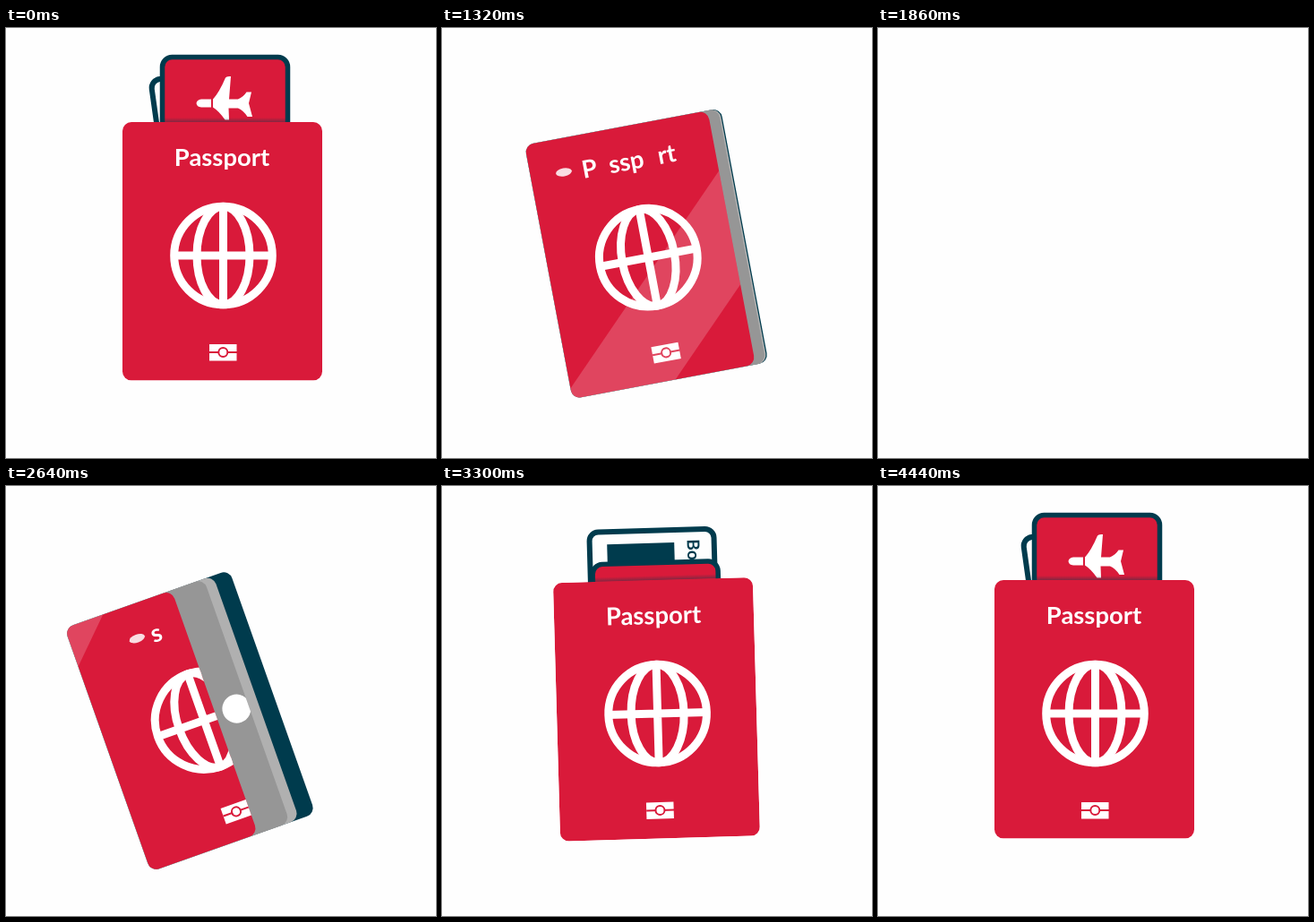
These frames come from a looping animation (480x480 px, 4770 ms). An HTML page:

```html
<!DOCTYPE html>
<html lang="en">
<head>
<meta charset="utf-8">
<title>Passport</title>
<style>
html, body { margin: 0; width: 100%; height: 100%; overflow: hidden; background: #fefefe; }
svg { display: block; width: 100vw; height: 100vh; }
text { font-family: Lato, sans-serif; font-weight: 700; }
</style>
</head>
<body>
<svg viewBox="0 0 480 480">
  <defs>
    <clipPath id="coverClip"><rect id="coverMask" x="130" y="105" width="223" height="288.5" rx="10"/></clipPath>
    <clipPath id="pageClip"><rect id="pageMask" x="130" y="105" width="223" height="288.5" rx="10"/></clipPath>
    <linearGradient id="shade" x2="0" y2="1">
      <stop offset="0" stop-color="#003b4d" stop-opacity="0"/>
      <stop offset="1" stop-color="#003b4d" stop-opacity=".4"/>
    </linearGradient>
  </defs>
  <g id="book">
    <g id="cards">
      <g id="pass">
        <rect x="172" y="48" width="139" height="174" rx="10" fill="#fefefe" stroke="#003b4d" stroke-width="6"/>
        <rect x="191.5" y="62" width="75" height="120" fill="#003b4d"/>
        <text transform="translate(281 59) rotate(90)" font-size="19" fill="#003b4d">Boarding pass</text>
      </g>
      <g id="ticket">
        <rect x="174.5" y="32.5" width="140" height="174" rx="11" fill="#d91a3a" stroke="#003b4d" stroke-width="5.5"/>
        <path fill="#fff" d="M229 79.5H218Q213 80 212.5 84Q213 88 218 88.5H229ZM231 79.5Q238 72 245 55.5Q246 53.5 251 54L249 79.5H259Q265 77 268.5 71.5H274L271 84L275 99H269.5Q265 92 259 89.5H248.5L249 102.5H244.5Q238 93 231 88.5Z"/>
      </g>
      <rect x="173" y="100" width="143" height="5" fill="url(#shade)"/>
    </g>
    <g id="pages">
      <rect id="back" x="130" y="105" height="288.5" rx="10" fill="#003b4d"/>
      <rect id="leaf" x="130" y="105" height="288.5" rx="10" fill="#b0b0b0"/>
      <rect id="page" x="130" y="105" height="288.5" rx="10" fill="#969696"/>
      <g clip-path="url(#pageClip)"><circle cx="281" cy="254" r="16" fill="#fff"/></g>
    </g>
    <g clip-path="url(#coverClip)">
      <rect x="130" y="105" width="223" height="288.5" fill="#d91a3a"/>
      <text x="241" y="154" font-size="27.4" text-anchor="middle" fill="#fff" id="title"></text>
      <ellipse id="smear" cy="143" rx="9" ry="4.5" fill="#fff" opacity="0"/>
      <g fill="none" stroke="#fff" stroke-width="9">
        <circle cx="242.5" cy="254" r="54.8"/>
        <ellipse cx="242.5" cy="254" rx="29.5" ry="54.8"/>
        <path d="M242.5 199V309M187 254H298"/>
      </g>
      <rect x="227" y="353" width="30.5" height="18.5" fill="#fff"/>
      <path d="M227 362H258" stroke="#d91a3a" stroke-width="2"/>
      <circle cx="242.3" cy="362" r="5" fill="#fff" stroke="#d91a3a" stroke-width="2"/>
      <path id="shine" fill="#fff" opacity=".19"/>
    </g>
  </g>
</svg>
<script>
const LOOP = 4770, STEP = 30, TURN = 2095, OPEN = 1240, GONE = 1855;
const CX = 241.5, CY = 249, W = 223;
const $ = id => document.getElementById(id);
const ramp = (t, from, span, pow) => Math.pow(Math.max(0, (t - from) / span), pow);
const show = (el, on) => el.setAttribute("visibility", on ? "visible" : "hidden");
const setWidth = (id, w) => $(id).setAttribute("width", Math.max(0, w).toFixed(2));

const letters = [..."Passport"].map(ch => {
  const span = document.createElementNS("http://www.w3.org/2000/svg", "tspan");
  span.textContent = ch;
  $("title").append(span);
  return span;
});
// when each letter drops out while the cover turns
const dropAt = [1440, 1230, GONE, 1440, 1440, 1230, GONE, GONE];

function drawCards(u) {
  show($("cards"), u < 1150);
  const dip = Math.min(90, 56 * ramp(u, 300, 600, 3.1));
  $("ticket").setAttribute("transform", `translate(0 ${dip})`);
  const k = Math.min(1, (u - 300) / 400);
  const tilt = -8 * (1 - k * k * (3 - 2 * k));
  const drop = Math.min(75, 60 * ramp(u, 820, 300, 2.5));
  $("pass").setAttribute("transform", `translate(0 ${drop}) rotate(${tilt} 241 129)`);
}

// every sheet swings on the spine at its own pace
function drawSheets(u) {
  const p = Math.min(1, ramp(u, OPEN, GONE - OPEN, 1));
  const width = pow => W * Math.cos(Math.PI / 2 * Math.pow(p, pow));
  show($("pages"), p > 0);
  setWidth("back", width(1.65));
  setWidth("leaf", width(1.26));
  setWidth("page", width(1.1));
  setWidth("pageMask", width(1.1));
  setWidth("coverMask", width(0.71));
}

function drawCover(u) {
  letters.forEach((el, i) => el.setAttribute("fill-opacity", u < dropAt[i] ? 1 : 0));
  $("smear").setAttribute("opacity", u < 1230 ? 0 : 0.85);
  $("smear").setAttribute("cx", CX - 74 + (u - 1320) * 0.152);
  // diagonal band where x + y runs from d - 129 to d
  const d = 150 - 1.565 * (u - 1320) + CX + CY;
  $("shine").setAttribute("d",
    `M${d - 529} 400L${d - 229} 100H${d - 100}L${d - 400} 400Z`);
}

function draw(time) {
  const t = Math.floor((time % LOOP) / STEP) * STEP;
  const u = Math.max(300, t < TURN ? t : 2 * TURN - t);
  $("book").style.display = u < GONE ? "" : "none";
  if (u >= GONE) return;
  const angle = 19.5 * ramp(u, 550, 1000, 2.3);
  const late = ramp(u, 1560, 290, 2);
  const dx = -1.25 * angle - 13 * late, dy = 16 * late;
  $("book").setAttribute("transform",
    `rotate(${-angle} ${CX} ${CY}) translate(${dx} ${dy})`);
  drawCards(u);
  drawSheets(u);
  drawCover(u);
}

let start;
function tick(now) {
  start ??= now;
  draw(now - start);
  requestAnimationFrame(tick);
}
draw(0);
requestAnimationFrame(tick);
</script>
</body>
</html>
```
